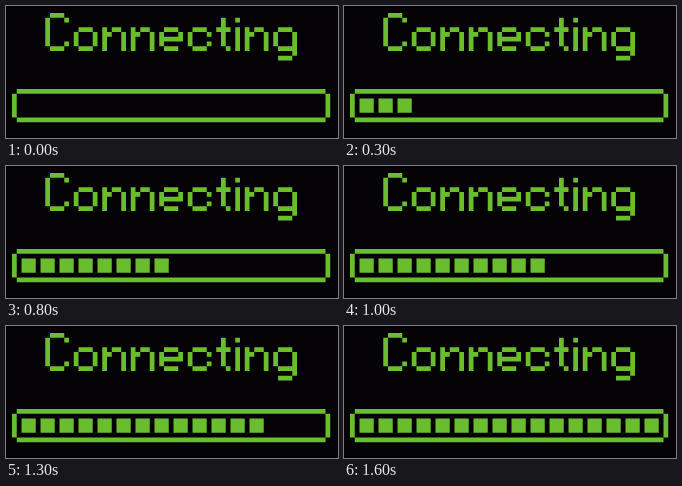
Animation of 332 by 132 pixels, one loop 1700 ms. Source, as an HTML page:

```html
<!DOCTYPE html>
<html lang="en">
<head>
<meta charset="utf-8">
<title>Connecting</title>
<style>
  html, body { margin: 0; width: 100%; height: 100%; overflow: hidden; background: #040204; }
  svg { display: block; width: 332px; height: 132px; fill: #69bd2f; }
  /* 17 states from empty to full, one block more at each */
  #fill { animation: load 1.7s steps(17) infinite; }
  @keyframes load { to { width: 68px; } }
</style>
</head>
<body>
<svg viewBox="0 0 332 132" role="img" aria-label="Connecting">
  <!-- one unit is one cell of the pixel grid -->
  <g transform="translate(6 7) scale(4.75)">
    <clipPath id="clip"><rect id="fill" x="1.5" y="17" width="0" height="5"/></clipPath>
    <path id="word"/>
    <path d="M1 16h65v1h-65zM1 22h65v1h-65zM0 17h1v5h-1zM66 17h1v5h-1z"/>
    <path id="blocks" clip-path="url(#clip)"/>
  </g>
</svg>
<script>
  // Each glyph: first row, then its rows of cells
  const glyphs = {
    C: [0, '.###.', '#...#', '#', '#', '#', '#', '#...#', '.###.'],
    o: [3, '.###.', '#...#', '#...#', '#...#', '.###.'],
    n: [3, '#.##.', '##..#', '#...#', '#...#', '#...#'],
    e: [3, '.###.', '#...#', '#####', '#', '.###.'],
    c: [3, '.###.', '#...#', '#', '#...#', '.###.'],
    t: [1, '.#.', '.#.', '###', '.#.', '.#.', '.#.', '..#'],
    i: [1, '#', '.', '#', '#', '#', '#', '#'],
    g: [3, '.###.', '#...#', '#...#', '#...#', '.####', '....#', '.###.']
  };

  const square = (x, y, size) => `M${x} ${y}h${size}v${size}h${-size}z`;

  let col = 7, word = '';
  for (const ch of 'Connecting') {
    const [top, ...rows] = glyphs[ch];
    rows.forEach((row, r) => [...row].forEach((dot, c) => {
      if (dot === '#') word += square(col + c, top + r, 1);
    }));
    col += Math.max(...rows.map(row => row.length)) + 1;
  }
  document.getElementById('word').setAttribute('d', word);

  let blocks = '';
  for (let i = 0; i < 16; i++) blocks += square(2 + i * 4, 18, 3);
  document.getElementById('blocks').setAttribute('d', blocks);
</script>
</body>
</html>
```
